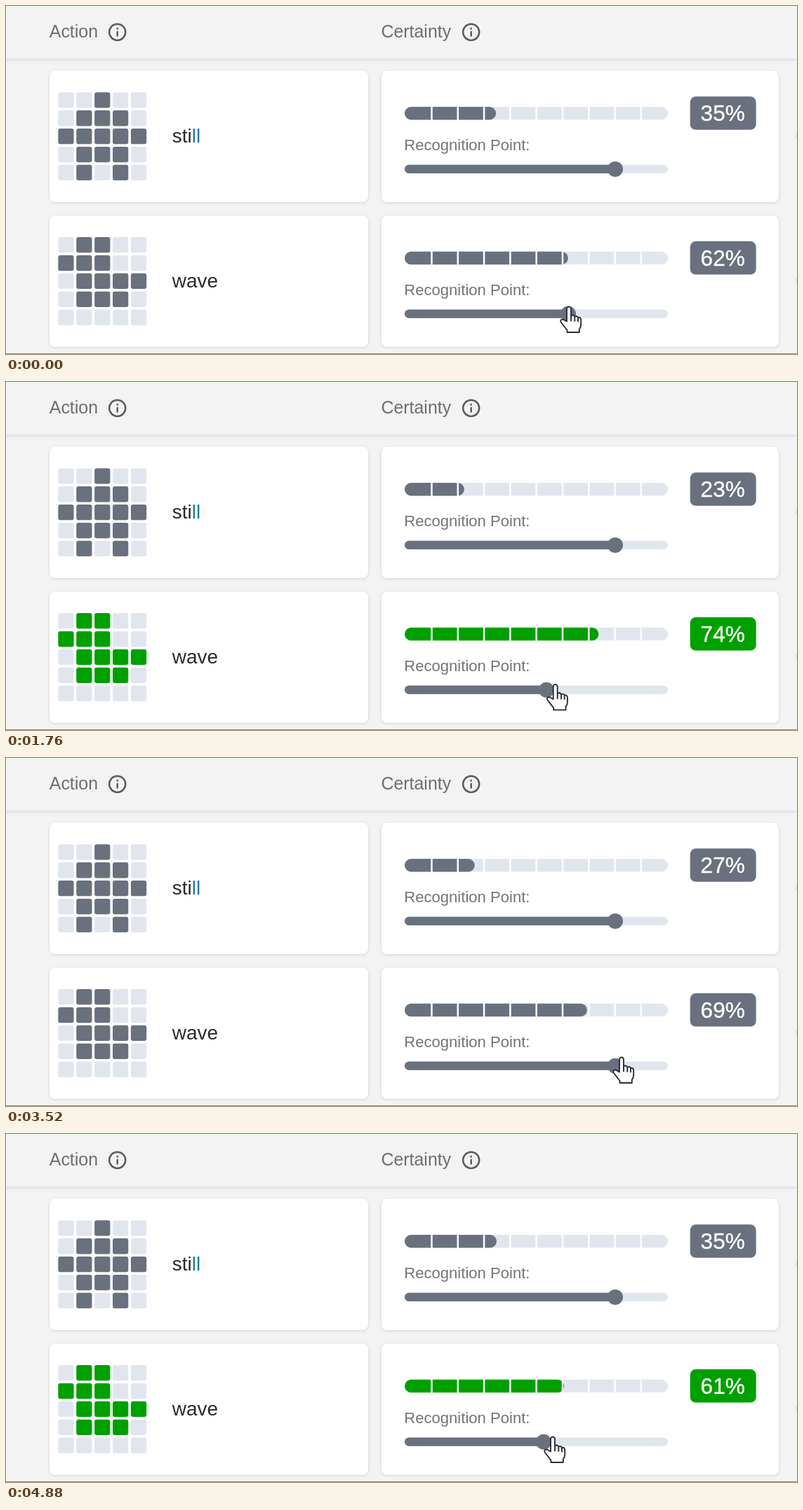
These frames come from a looping animation (1127 px wide and 497 px high, 4.96 s). An HTML page:

```html
<!DOCTYPE html>
<html lang="en">
<head>
<meta charset="utf-8">
<title>Recognition points</title>
<style>
html, body { margin: 0; width: 100%; height: 100%; overflow: hidden; background: #f3f3f3; }
svg { display: block; width: 1127px; height: 497px; font-family: "Liberation Sans", Arial, sans-serif; }
.card { fill: #fff; filter: drop-shadow(0 1px 2px #0002); }
.light { fill: #e1e6ee; }
.dark { fill: #69717e; }
.gap { stroke: #fff; stroke-width: 2.5; }
.top { fill: #e6f5e4; }
.rule { fill: #e2e4ee; }
.bottom { fill: #858585; }
.head { font-size: 24.9px; fill: #6e6e6e; }
.name { font-size: 28px; fill: #2b2b2b; }
.tint { fill: #23799a; }
.label { font-size: 22.1px; fill: #747474; }
.pct { font-size: 31.6px; fill: #fff; stroke: #fff; stroke-width: .4; text-anchor: middle; }
.icon { fill: none; stroke: #5c5c5c; stroke-width: 2.5; }
#hand { fill: #fff; stroke: #2c2c34; stroke-width: 1.9; stroke-linejoin: round; stroke-linecap: round; }
</style>
</head>
<body>
<svg id="stage" viewBox="0 0 1127 497"></svg>
<script>
const LOOP = 4960, STEP = 80, X0 = 568, WIDTH = 375;
const GREY = [105, 113, 126], GREEN = [0, 160, 0];
const rows = [
  { name: 'sti<tspan class="tint">ll</tspan>', grid: '..#...###.#####.###..#.#.' },
  { name: 'wave', grid: '.##..###...####.###......' }
];
// time and certainty of "wave" at its turning points
const turns = [[0, 62.1], [1040, 64], [1280, 71], [1760, 73.7], [2240, 68.5],
  [2480, 59.7], [2720, 67], [3440, 69.3], [4160, 67.1], [4880, 60.6]];
// times at which "wave" turns recognised or unrecognised
const switches = [160, 2400, 4320];

const attr = id => id ? ` id="${id}"` : '';
const rect = (x, y, w, h, r = 0, cls = '', id = '') =>
  `<rect x="${x}" y="${y}" width="${w}" height="${h}" rx="${r}" class="${cls}"${attr(id)}/>`;
const text = (x, y, cls, s, id = '') => `<text x="${x}" y="${y}" class="${cls}"${attr(id)}>${s}</text>`;
const heading = (x, s, iconX) => text(x, 45, 'head', s) +
  `<g class="icon"><circle cx="${iconX}" cy="37.3" r="11.6"/><path d="M${iconX} 36v7.5m0-12.5v2.6"/></g>`;

function row({ name, grid }, i) {
  const cells = mark => [...grid].map((c, k) => c === mark
    ? rect(74.3 + k % 5 * 25.9, 123.2 + Math.floor(k / 5) * 25.9, 22.3, 22.3, 3) : '').join('');
  const gaps = Array.from({ length: 9 }, (_, k) => `M${606.5 + 37.3 * k} 143v20`).join('');
  return `<g transform="translate(0 ${i * 206.8})">
    ${rect(62, 92.5, 454, 187.5, 8, 'card')}${rect(535, 92.5, 566, 187.5, 8, 'card')}
    <g class="light">${cells('.')}</g><g class="dark" id="grid${i}">${cells('#')}</g>
    ${text(236.8, 195, 'name', name)}
    ${rect(X0, 144, WIDTH, 18.5, 9.2, 'light')}${rect(X0, 144, 0, 18.5, 9.2, 'dark', 'bar' + i)}
    <path class="gap" d="${gaps}"/>
    ${rect(974.7, 129.3, 94, 47.5, 8, 'dark', 'badge' + i)}${text(1021.2, 164.2, 'pct', '', 'pct' + i)}
    ${text(567.2, 206.2, 'label', 'Recognition Point:')}
    ${rect(X0, 226.8, WIDTH, 12.2, 6, 'light')}${rect(X0, 226.8, 300, 12.2, 6, 'dark', 'track' + i)}
    <circle cx="868" cy="232.9" r="11" class="dark" id="thumb${i}"/>
    <path d="M1126.5 182v7" stroke="#ccc"/>
  </g>`;
}

const $ = id => document.getElementById(id);
$('stage').innerHTML = `${rect(0, 0, 1127, 1, 0, 'top')}${rect(0, 75.2, 1127, 3.2, 0, 'rule')}
  ${heading(61.8, 'Action', 158.7)}${heading(534.5, 'Certainty', 662.7)}
  ${rows.map(row).join('')}
  ${rect(0, 496, 1127, 1, 0, 'bottom')}
  <g id="hand">
    <path d="M-3 21V3a3 3 0 0 1 6 0V13q3-2.4 5.3 1q3-1.6 4.7 1.4q4-1 4.2 3.4V25q0 4-2.4 7V36.5H-2.5V33.5L-11 22.5q-2-3.2 1-4.4q2.4-.5 4.4 1.6Z"/>
    <path d="M3 13v7m5.3-5.5v6m4.7-4.5v5"/>
  </g>`;

const mix = (a, b, p) => a + (b - a) * p;
const rgb = p => `rgb(${GREY.map((g, i) => Math.round(mix(g, GREEN[i], p)))})`;

function ease(t, from, to) {
  const p = Math.min(1, Math.max(0, (t - from) / (to - from)));
  return p * p * (3 - 2 * p);
}

function certainty(t) {
  const i = turns.findLastIndex(k => k[0] <= t);
  const [t0, a] = turns[i], [t1, b] = turns[i + 1] || [LOOP, a];
  return mix(a, b, (t - t0) / (t1 - t0));
}

function draw(now) {
  const t = Math.floor(now % LOOP / STEP) * STEP;

  // a new reading every third step; the two certainties add up to slightly under 100
  const read = Math.max(0, Math.floor((t - STEP) / 240) * 240 + STEP);
  const wave = certainty(read);
  [96.8 - 1.3 * read / LOOP - wave, wave].forEach((v, i) => {
    $('bar' + i).setAttribute('width', v / 100 * WIDTH);
    $('pct' + i).textContent = Math.round(v) + '%';
  });

  // the grid fades between colours, bar and badge switch at once
  const past = switches.filter(s => s <= t), on = past.length % 2;
  const fade = past.length ? Math.min(1, (t - past.at(-1)) / 180) : 1;
  $('bar1').style.fill = $('badge1').style.fill = rgb(on);
  $('grid1').style.fill = rgb(mix(1 - on, on, fade));

  // three drags of the slider, with the hand slightly out of step
  const x = 801 - 31 * ease(t, 0, 560) + 98 * ease(t, 1760, 2240) - 102 * ease(t, 3520, 4840);
  const a = ease(t, 0, 560), b = ease(t, 1720, 2240), c = ease(t, 3520, 4680);
  const handX = 802 - 21 * a + 102 * b - 6 * ease(t, 3440, 3520) - 98 * c;
  $('thumb1').setAttribute('cx', x);
  $('track1').setAttribute('width', x - X0);
  $('hand').setAttribute('transform', `translate(${handX} ${429.5 + 2.5 * a - 4.5 * b + 5 * c})`);
}

const start = performance.now();
function tick() {
  draw(performance.now() - start);
  requestAnimationFrame(tick);
}
tick();
</script>
</body>
</html>
```
